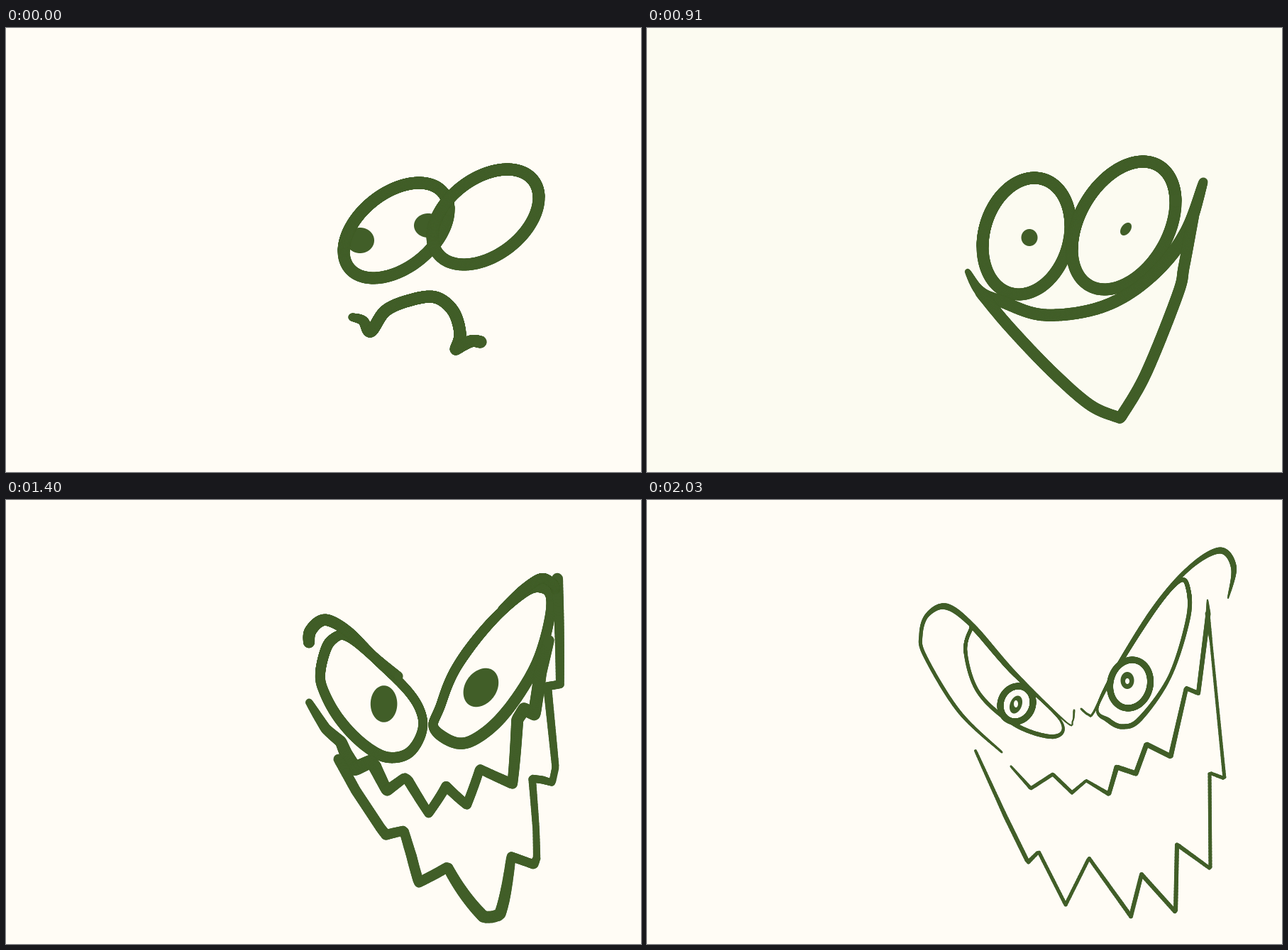
Animation of 895 by 625 pixels, one loop 2100 ms. Source, as an HTML page with a canvas:

```html
<!DOCTYPE html>
<html lang="en">
<head>
<meta charset="utf-8">
<title>Mood face</title>
<style>
html, body { margin: 0; width: 100%; height: 100%; overflow: hidden; background: #fffcf5; }
canvas { display: block; width: 895px; height: 625px; }
</style>
</head>
<body>
<canvas id="stage" width="895" height="625"></canvas>
<script>
const STEP = 70, STEPS = 30, SAMPLES = 260, INK = '#415e28';
const ctx = document.getElementById('stage').getContext('2d');
const mix = (a, b, k) => a + (b - a) * k;
const poses = [];
let parts;

// --- curve helpers: every point is [x, y, width] ---

// Reads "x,y[,width][*]"; a width lasts until the next one, * marks a corner.
function parse(text, allCorners) {
  let width = 1;
  return text.split(' ').map(token => {
    const [x, y, w = width] = token.replace('*', '').split(',').map(Number);
    width = w;
    return { at: [x, y, w], corner: allCorners || token.endsWith('*') };
  });
}

function spline(a, b, c, d, t) {
  return b + 0.5 * t * (c - a + t * (2 * a - 5 * b + 4 * c - d + t * (3 * (b - c) + d - a)));
}

function curve(pts, closed) {
  const n = pts.length, last = closed ? n : n - 1, out = [];
  const get = i => closed ? pts[(i + n) % n] : pts[Math.max(0, Math.min(n - 1, i))];
  for (let i = 0; i < last; i++) {
    const b = get(i), c = get(i + 1);
    const a = b.corner ? b : get(i - 1), d = c.corner ? c : get(i + 2);
    for (let j = 0; j < 16; j++) {
      const t = j / 16;
      const xy = [0, 1].map(k => spline(a.at[k], b.at[k], c.at[k], d.at[k], t));
      out.push([...xy, mix(b.at[2], c.at[2], t)]);
    }
  }
  out.push(get(last).at);
  return out;
}

function resample(line) {
  const len = [0];
  for (let i = 1; i < line.length; i++) {
    len.push(len[i - 1] + Math.hypot(line[i][0] - line[i - 1][0], line[i][1] - line[i - 1][1]));
  }
  const total = len[len.length - 1], out = [];
  for (let i = 0, j = 1; i < SAMPLES; i++) {
    const d = i / (SAMPLES - 1) * total;
    while (j < line.length - 1 && len[j] < d) j++;
    const k = (d - len[j - 1]) / (len[j] - len[j - 1] || 1);
    out.push(line[j].map((v, c) => mix(line[j - 1][c], v, k)));
  }
  return out;
}

// --- pose building ---
function pose(step, paper = [255, 252, 245]) {
  parts = {};
  poses.push({ step, paper, parts });
}
const open = (name, text) => parts[name] = resample(curve(parse(text)));
const ring = (name, text) => parts[name] = resample(curve(parse(text), true));
const sharp = (name, text) => parts[name] = resample(curve(parse(text, true)));

// A leaning oval inside the box cx ± rx, cy ± ry, clockwise from its left.
function egg(name, cx, cy, rx, ry, lean = 0, w = 1) {
  const line = [];
  for (let i = 0; i <= 90; i++) {
    const s = i / 45 * Math.PI - Math.PI / 2;
    line.push([cx + rx * Math.sin(s), cy - ry * Math.cos(s - lean), w]);
  }
  parts[name] = resample(line);
}

// Worried
pose(0);
egg('eyeL', 550, 285, 74, 67, 0.45, 17);
egg('eyeR', 676, 266, 75, 67, 0.42, 17);
egg('pupilL', 499, 299, 20, 18);
egg('pupilR', 595, 278, 20, 17);
open('mouth', '488,407,11 503,412,14 514,427*,17 535,398 570,383 605,379 630,398 640,430 634,452* 655,441 669,442');

// Sad
pose(4);
egg('eyeL', 545, 285, 64, 66, 0.35, 17);
egg('eyeR', 678, 270, 71, 74, 0.37, 17);
egg('pupilL', 542, 289, 18.5, 21.5, 0.15);
egg('pupilR', 679, 265, 19.5, 24);
open('mouth', '489,388,9 504,408*,10 545,390,13 575,383,15 610,391 633,410 650,430 679,406,16');

// Smug
pose(9, [254, 250, 243]);
egg('eyeL', 543, 288, 62, 77, 0.28, 17);
egg('eyeR', 673, 276, 70, 87, 0.37, 17);
open('lidL', '490,294,16 540,280 605,282');
open('lidR', '605,282,16 670,270 742,272');
egg('pupilL', 540, 294, 20, 14);
egg('pupilR', 677, 283, 21, 14);
open('mouth', '480,380,11 525,402,14 580,419 640,404 708,380,15');
open('jaw', '505,404,15 545,455,16 590,477 632,456 685,398');

// Grinning
pose(13, [252, 251, 241]);
egg('eyeL', 535, 293, 62, 82, 0.18, 17);
egg('eyeR', 672, 278, 73, 90, 0.38, 17);
egg('pupilL', 539, 295, 11.5, 12);
egg('pupilR', 675, 283, 8, 9, 0.4);
open('mouth', '452,343,8 470,371,15 500,385,17 560,404 640,393 705,355 757,293,19 784,217,13');
open('jaw', '470,372,16 510,420 570,483 625,531 667,549* 703,487 748,375 757,335 770,265');

// Vicious
pose(18);
ring('eyeL', '449,246,16 461,200 480,186,13 523,211 569,262 581,305 566,355,15 530,371,16 490,340 458,285');
ring('eyeR', '598,318,16 606,265 633,219 685,168,13 738,138 753,162 735,240,15 690,310,17 645,341 612,338');
open('browL', '447,171,18 480,182,15 520,206,12');
open('browR', '742,114,11 718,143,14 690,163');
egg('pupilL', 531, 289, 22, 30);
egg('pupilR', 673, 270, 28, 34, 0.35);
open('mouth', '432,284,11 445,314,18 470,345,24 520,392,16 580,424,14 635,411,15 680,372 720,300,20 740,243,15');
open('jaw', '495,380,13 545,460 585,530 635,572,16 685,581,17 720,560,16 748,478,11 759,370,9 763,230,10 763,150,13 759,98,17');
open('bagL', '522,384,16 558,394 579,378 588,335');
open('bagR', '600,345,15 625,383 665,372 705,313');
sharp('shadeL', '440,300 470,310 530,375 525,400 465,350');
sharp('shadeR', '690,318 742,240 705,345 675,372');
sharp('shadeM', '590,425 632,420 650,480 628,470 596,488');
[
  '541,446,14 562,428,13 580,510,12 587,528,14 610,470,12',
  '570,432,8 590,484',
  '620,430,15 645,582',
  '630,425,14 652,533 651,420,9',
  '665,572,16 659,450,13 690,525 718,563',
  '656,402,13 688,463,17 690,362,15',
  '722,525,13 701,396,15 745,473,12',
  '700,352,12 741,430,16 738,245',
].forEach((text, i) => sharp('tooth' + i, text));

// Furious
pose(23);
ring('eyeL', '434,240,11 445,203,13 462,196 480,202 520,246 597,312*,12 573,354,15 520,338 465,300,13 439,262,11');
ring('eyeR', '608,312*,9 632,288 660,230,10 705,158,13 752,106 775,102,15 792,125 770,208 727,280 680,330 650,342 622,326');
open('browL', '397,245,13 386,205,17 402,165 430,156 480,188,15 540,256,13 604,311,12');
open('browR', '823,145,15 828,112 805,69 760,90 715,142,14');
egg('irisL', 529, 292, 29, 35, 0.2, 11);
egg('irisR', 679, 256, 33, 35, 0.1, 9);
egg('pupilL', 535, 284, 14, 19.5);
egg('pupilR', 664, 255, 20, 19);
egg('holeL', 535, 284, 4, 5.5);
egg('holeR', 663, 256, 4, 5.5);
sharp('mouth', '420,286,9 465,344,12 505,368 512,395,13 530,434,14 562,388 573,397 592,460,10 622,388 630,393,12 661,483,9 666,370,14 697,445,11 695,343,10 765,440,14 740,285,15 757,262,17 782,302,15 785,205,18 803,130,15');
sharp('jaw', '429,342,16 462,408 515,485 527,498,17 566,440,14 575,495,17 579,553 620,443,13 642,598,17 657,602 676,600 675,473,13 733,592,17 742,580,10 735,520,9 716,416,13 750,460,14 783,515,10 794,484,11 763,318,15 807,348,13 804,130,15');

// Thin and ghostly
pose(29);
ring('eyeL', '449,215,5 456,183 463,184 512,240 582,309*,3 574,333,6 520,317 468,272,5');
ring('eyeR', '635,292*,3 665,232,6 718,150 750,114 762,122 763,165 737,248,5 695,308,7 670,319 650,310');
open('browL', '500,355,3 440,298,5 392,220 386,190 395,162,6 422,150,9 460,178,7 518,243,5 590,312,2 600,311 602,296,3');
open('browR', '819,138,2 827,95,8 808,71,9 765,95,6 715,152 660,240 630,298,3 622,302 612,294');
egg('irisL', 521, 287, 23, 25, 0.1, 9);
egg('irisR', 681, 259, 28.5, 34, 0.1, 9);
egg('pupilL', 520, 288, 9, 12.5, 0.3);
egg('pupilR', 677, 254, 9.5, 12);
egg('holeL', 520, 287, 3, 5);
egg('holeR', 677, 255, 3, 4);
sharp('mouth', '513,375,3 541,406,5 572,386 599,412 619,395,4 651,414,6 662,376,7 689,385 704,344 738,361 760,265,6 777,272 791,160,7 790,141,2');
sharp('jaw', '463,353,4 505,445,6 537,510 552,495,5 590,570 623,504 682,586,6 697,527 745,580 747,485 794,519,5 793,384 814,392 795,200,4 790,160,7');

// A raised lid hides in the top of its eye, a shut jaw hides in the mouth.
for (const { parts: p } of poses) {
  for (const side of ['L', 'R']) {
    p['lid' + side] ||= resample(p['eye' + side].slice(0, SAMPLES / 2));
  }
  p.jaw ||= p.mouth;
}

// --- drawing ---
const order = [...new Set(poses.flatMap(p => Object.keys(p.parts)))];
const isFill = name => /^(pupil|hole|shade)/.test(name);

// A part known to one side only is held while that pose is near.
function between(a, b, k) {
  if (a && b) return a.map((s, i) => s.map((v, c) => mix(v, b[i][c], k)));
  return a ? (k < 0.4 ? a : null) : (k > 0.6 ? b : null);
}

function fillShape(line, color) {
  ctx.fillStyle = color;
  ctx.beginPath();
  line.forEach(([x, y]) => ctx.lineTo(x, y));
  ctx.fill();
}

function strokeShape(line) {
  for (let i = 1; i < line.length; i++) {
    ctx.lineWidth = (line[i - 1][2] + line[i][2]) / 2;
    ctx.beginPath();
    ctx.moveTo(line[i - 1][0], line[i - 1][1]);
    ctx.lineTo(line[i][0], line[i][1]);
    ctx.stroke();
  }
}

function draw(step) {
  let i = 0;
  while (i < poses.length - 2 && step >= poses[i + 1].step) i++;
  const a = poses[i], b = poses[i + 1];
  const k = (step - a.step) / (b.step - a.step);
  const paper = `rgb(${a.paper.map((v, c) => Math.round(mix(v, b.paper[c], k)))})`;
  ctx.fillStyle = paper;
  ctx.fillRect(0, 0, 895, 625);
  ctx.strokeStyle = INK;
  ctx.lineCap = 'round';
  for (const name of order) {
    const line = between(a.parts[name], b.parts[name], k);
    if (!line) continue;
    if (isFill(name)) fillShape(line, name.startsWith('hole') ? paper : INK);
    else strokeShape(line);
  }
}

let shown = -1;
const start = performance.now();
function tick() {
  const step = Math.floor((performance.now() - start) / STEP) % STEPS;
  if (step !== shown) draw(shown = step);
  requestAnimationFrame(tick);
}
tick();
</script>
</body>
</html>
```
